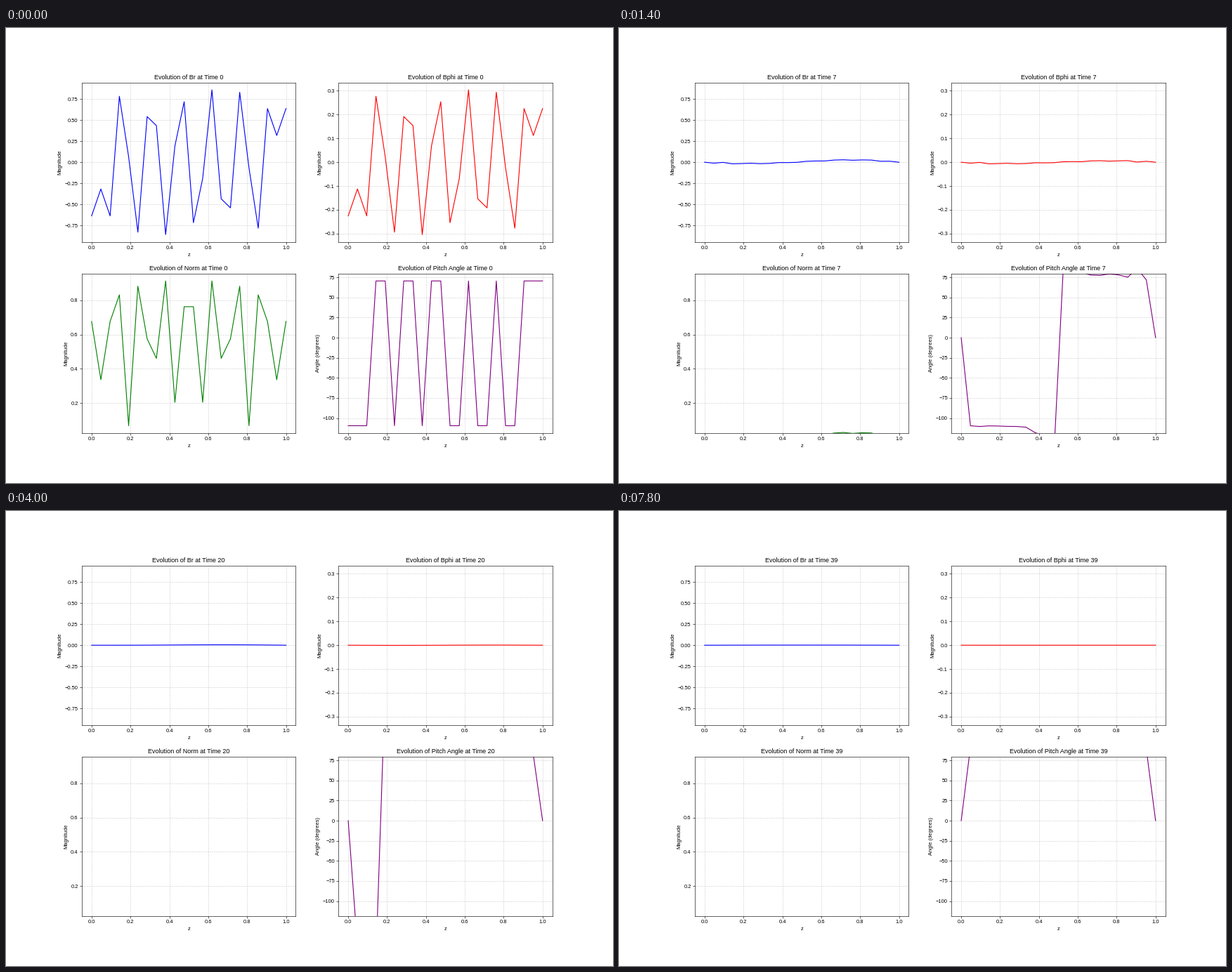
Write a matplotlib script that moves like this. It is 864x648 px and loops after 8 s.

```python
import numpy as np
import matplotlib.pyplot as plt
from matplotlib.animation import FuncAnimation

plt.rcParams["font.family"] = "Liberation Sans"

STEPS, CELLS = 40, 21
RATE = 2.0            # diffusion number per time step
AMP = 0.87
RATIO = 1 / np.sqrt(8)

z = np.linspace(0, 1, CELLS + 1)

# Crank-Nicolson operators on the inner points, field held at zero on both ends
lap = (np.diag(np.full(CELLS + 1, -2.0))
       + np.diag(np.ones(CELLS), 1) + np.diag(np.ones(CELLS), -1))
implicit = (np.eye(CELLS + 1) - RATE / 2 * lap)[1:-1, 1:-1]
explicit = (np.eye(CELLS + 1) + RATE / 2 * lap)[1:-1]


def diffuse(start, edge_gain=0.0):
    """Return the field at every time step."""
    rows = [start]
    u = start.copy()
    u[-2] += edge_gain * u[-1]
    for _ in range(STEPS - 1):
        new = np.zeros_like(u)
        new[1:-1] = np.linalg.solve(implicit, explicit @ u)
        rows.append(new)
        u = new
    return np.array(rows)


seed = AMP * np.cos(13 * np.pi * z)
seed[0], seed[-1] = seed[2], seed[-3]

br = diffuse(seed, edge_gain=1.0)
bphi = diffuse(RATIO * seed)
norm = np.hypot(br, bphi)
pitch = np.degrees(np.arctan2(br, bphi))

panels = [
    ("Br", br, "blue", "Magnitude"),
    ("Bphi", bphi, "red", "Magnitude"),
    ("Norm", norm, "green", "Magnitude"),
    ("Pitch Angle", pitch, "purple", "Angle (degrees)"),
]

fig, axes = plt.subplots(2, 2, figsize=(16, 12), dpi=54)
lines = []
for ax, (name, data, color, label) in zip(axes.flat, panels):
    lines.append(ax.plot(z, data[0], color=color)[0])
    ax.set_xlabel("z")
    ax.set_ylabel(label)
    ax.grid(True, linestyle="--", alpha=0.6)
    ax.set_xlim(ax.get_xlim())
    ax.set_ylim(ax.get_ylim())


def update(t):
    for ax, line, (name, data, _, _) in zip(axes.flat, lines, panels):
        line.set_ydata(data[t])
        ax.set_title(f"Evolution of {name} at Time {t}")
    return lines


anim = FuncAnimation(fig, update, frames=STEPS, interval=200,
                     init_func=lambda: update(0), repeat=True, blit=False)
plt.show()
```
